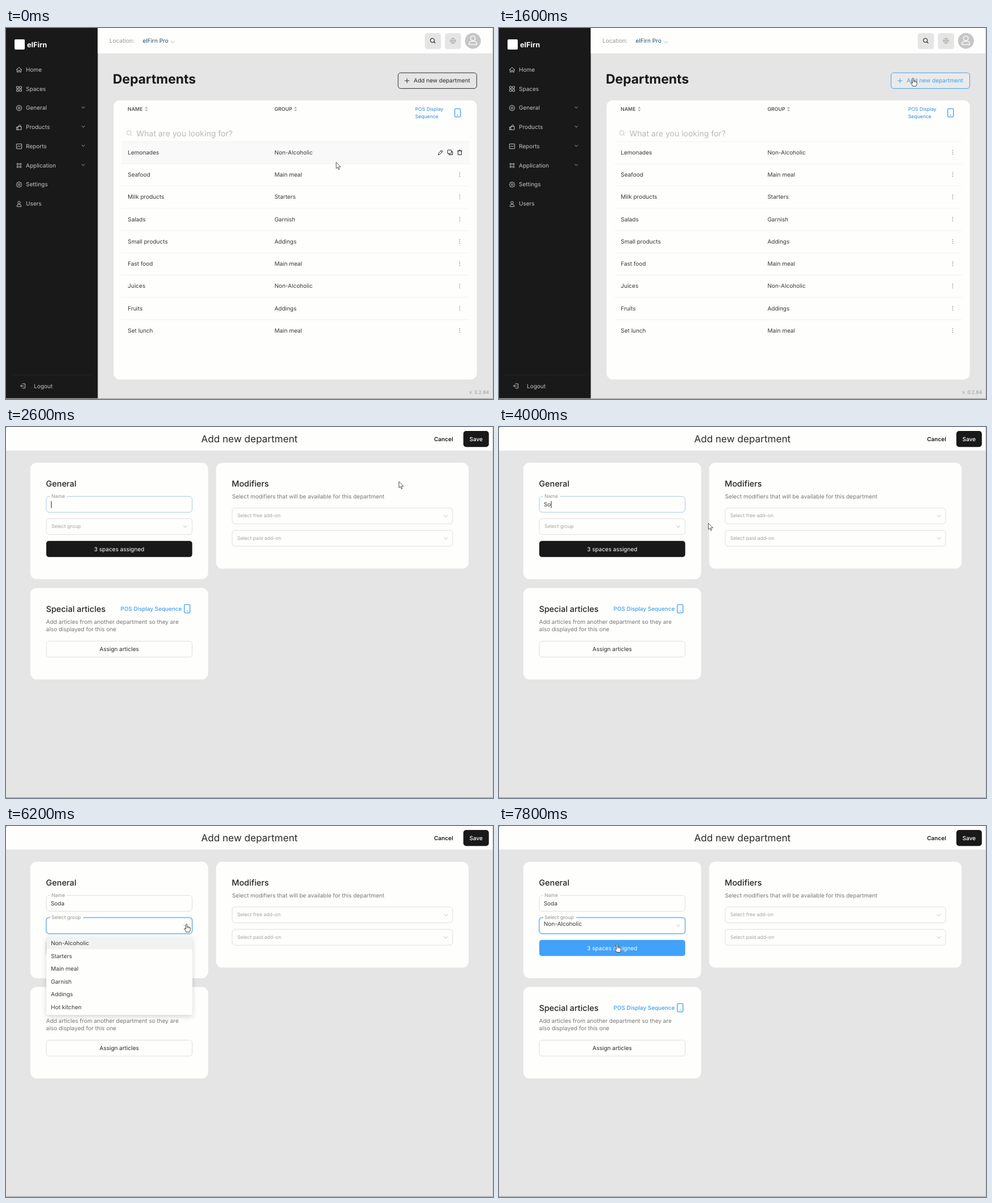
An HTML page for the animation above (8 s loop, 857x654 px).

```html
<!DOCTYPE html>
<html lang="en">
<head>
<meta charset="utf-8">
<title>Departments</title>
<style>
  html, body { margin: 0; width: 100%; height: 100%; overflow: hidden; background: #e5e5e5; }
  svg { display: block; width: 857px; height: 654px; }
  text { font-family: Inter, sans-serif; text-rendering: geometricPrecision; white-space: pre; }
</style>
</head>
<body>
<svg id="stage" viewBox="0 0 857 654" xmlns="http://www.w3.org/2000/svg">
  <defs>
    <filter id="shadow" x="-10%" y="-10%" width="120%" height="125%">
      <feDropShadow dx="0" dy="3" stdDeviation="4" flood-color="#000" flood-opacity=".16"/>
    </filter>
  </defs>
  <g id="list"></g>
  <g id="form"></g>
  <g id="frame"></g>
  <g id="cursor"></g>
</svg>
<script>
const LOOP = 8000, STEP = 200, OPEN_FORM = 1800, OPEN_MENU = 6200, PICK = 7400;
const PAPER = '#fefefd', INK = '#191919', TEXT = '#383838', BLUE = '#3f9fee', LINE = '#dedede';
const $ = id => document.getElementById(id);

// --- drawing helpers ---
const rect = (x, y, w, h, r, fill, stroke = 'none', sw = 1, extra = '') =>
  `<rect x="${x}" y="${y}" width="${w}" height="${h}" rx="${r}" fill="${fill}" stroke="${stroke}" stroke-width="${sw}" ${extra}/>`;
const text = (x, mid, str, size = 10, fill = TEXT, weight = 400, anchor = 'start') =>
  `<text x="${x}" y="${mid + size * 0.364}" font-size="${size}" fill="${fill}" font-weight="${weight}" text-anchor="${anchor}">${str}</text>`;
const path = (d, stroke, sw = 1, fill = 'none') =>
  `<path d="${d}" fill="${fill}" stroke="${stroke}" stroke-width="${sw}" stroke-linecap="round" stroke-linejoin="round"/>`;
const circle = (x, y, r, fill, stroke = 'none', sw = 1) =>
  `<circle cx="${x}" cy="${y}" r="${r}" fill="${fill}" stroke="${stroke}" stroke-width="${sw}"/>`;
const at = (x, y, body) => `<g transform="translate(${x} ${y})">${body}</g>`;
const chevron = (x, y, color, w = 2.8) => at(x, y, path(`M${-w} ${-w / 2}L0 ${w / 2}L${w} ${-w / 2}`, color));
const lens = (x, y, r, color, sw) =>
  at(x, y, circle(-0.6, -0.6, r, 'none', color, sw) + path(`M${r * 0.6} ${r * 0.6}l2 2`, color, sw));
const tablet = (x, y, h) => rect(x - 5, y - h / 2, 10, h, 1.6, 'none', BLUE, 1.3) + circle(x, y + h / 2 - 3.2, 0.9, BLUE);

// --- sidebar icons, centred on 0,0 ---
const G = '#c8c8c8';
const squares = (s, gap) => [-1, 1].map(a => [-1, 1].map(b =>
  rect(a * gap - s / 2, b * gap - s / 2, s, s, 0.4, 'none', G)).join('')).join('');
const polygon = (n, r, wobble = 0) => 'M' + Array.from({ length: n }, (_, i) => {
  const a = i / n * Math.PI * 2 - Math.PI / 2, q = r - (i % 2 ? wobble : 0);
  return (q * Math.cos(a)).toFixed(2) + ' ' + (q * Math.sin(a)).toFixed(2);
}).join('L') + 'Z';
const person = (color, sw) => circle(0, -2, 2.2, 'none', color, sw) +
  path('M-3.7 4.6V3.6Q-3.5 1.4-1.4 1.2H1.4Q3.5 1.4 3.7 3.6V4.6Z', color, sw);
const icons = {
  Home: path('M-4.6 0L0-4.2 4.6 0M-3.4-.8V4.2H-1.2V1.2H1.2V4.2H3.4V-.8', G),
  Spaces: squares(3.6, 2.6),
  General: path(polygon(8, 4.8), G) + circle(0, 0, 1.8, 'none', G),
  Products: path('M-1.8-1.2H4V4.4H-1.8ZM-.4-1.2V-3Q1.2-5.4 2.6-3V-1.2M-4.4 0H-1.8M-4.4 4.4H-1.8M-4.4 0V4.4', G),
  Reports: rect(-4.6, -4.2, 9.2, 8.4, 0.6, 'none', G) + path('M-2.8 1L-1-1 .8.8 2.8-1.4', G),
  Application: squares(2.6, 2.4),
  Settings: path(polygon(16, 5, 1), G) + circle(0, 0, 1.7, 'none', G),
  Users: person(G, 1)
};

const rows = [
  ['Lemonades', 'Non-Alcoholic'], ['Seafood', 'Main meal'], ['Milk products', 'Starters'],
  ['Salads', 'Garnish'], ['Small products', 'Addings'], ['Fast food', 'Main meal'],
  ['Juices', 'Non-Alcoholic'], ['Fruits', 'Addings'], ['Set lunch', 'Main meal']
];
const groups = ['Non-Alcoholic', 'Starters', 'Main meal', 'Garnish', 'Addings', 'Hot kitchen'];

function sidebar() {
  let s = rect(0, 0, 161.5, 654, 0, INK) + rect(15, 20, 18, 18, 2, '#fff') +
    text(37, 29.5, 'elFirn', 12.7, '#fff', 700);
  Object.keys(icons).forEach((name, i) => {
    const y = 73.2 + i * 33.75;
    s += at(23, y + 0.4, icons[name]) + text(35, y, name, 10, '#c4c4c4');
    if (i > 1 && i < 6) s += chevron(136, y - 0.6, '#a5a5a5', 2.5);
  });
  return s + rect(8, 611, 146, 1, 0, '#232323') +
    at(30, 631, path('M-1-3.8H3.6V3.8H-1M1 0H-4.4M-2.4-2L-4.4 0L-2.4 2', G)) +
    text(49, 631, 'Logout', 10, '#c4c4c4');
}

function topBar() {
  return rect(161.5, 0, 696, 44.7, 0, PAPER) + text(182, 22, 'Location:', 10.1, '#999') +
    text(240.5, 22.5, 'elFirn Pro', 10, '#1b5272') + chevron(293.5, 25, '#b5b5b5', 3.2) +
    rect(737, 9, 28.5, 28.2, 4.5, '#e5e5e5') + lens(751, 22.4, 3.5, '#222', 1.1) +
    rect(772.3, 9, 28.5, 28.2, 4.5, '#e5e5e5') +
    at(786.5, 22.7, circle(0, 0, 4.6, 'none', '#999', 0.8) +
      path('M-4.6 0H4.6M0-4.6Q-4 0 0 4.6M0-4.6Q4 0 0 4.6', '#999', 0.8)) +
    circle(821.6, 22.7, 14, '#c6c6c6') +
    at(821.6, 22, circle(0, -3.8, 4.1, 'none', '#fff', 1.3) +
      path('M-6.8 7.2V5.6Q-6.2 2-2.6 1.4H2.6Q6.2 2 6.8 5.6V7.2Z', '#fff', 1.3));
}

const sorter = (x, y) => path(`M${x - 2} ${y - 1.4}h4l-2-2.4ZM${x - 2} ${y + 1.4}h4l-2 2.4Z`, '#aaa', 0.5, '#aaa');

function rowTools(y) {
  const c = '#222';
  return at(764.7, y, path('M-4 4L-3.3 1.3 1.8-3.8 3.8-1.8-1.3 3.3ZM.6-2.6L2.6-.6', c)) +
    at(781.5, y, rect(-4.4, -4.2, 6.6, 6.2, 0.6, 'none', c) + path('M-2 2V4.2H4.4V-1.6H2.2', c)) +
    at(798.5, y, path('M-4-2.6H4M-1.4-2.8V-4.2H1.4V-2.8M-3-2.4V4.2H3V-2.4', c));
}

function listView(c) {
  const over = c.y < 110 && c.x > 690, tone = over ? BLUE : '#2b2b2b';
  const hovered = Math.floor((c.y - 200) / 39.25);
  let s = rect(161, 44, 696, 610, 0, '#e5e5e5') + sidebar() + topBar() +
    text(188, 89.7, 'Departments', 22.9, INK, 700) +
    rect(690, 79, 138.3, 27.6, 4.5, over ? '#eaeaea' : '#e5e5e5', tone) +
    path('M702 93h7.4M705.7 89.3v7.4', tone) + text(717.6, 92.8, 'Add new department', 10, tone) +
    rect(189.3, 127.5, 639.2, 492, 11, PAPER) +
    text(214, 142.6, 'NAME', 8.8, '#555', 600) + sorter(247, 142.8) +
    text(472.5, 142.6, 'GROUP', 8.8, '#555', 600) + sorter(509.5, 142.8) +
    text(720, 142.7, 'POS Display', 8.6, '#2f86dd') + text(720, 155.8, 'Sequence', 8.6, '#2f86dd') +
    tablet(794.7, 149.5, 14.4) +
    lens(216.8, 185.4, 3.9, '#c2c2c2', 1) + text(229.5, 185.7, 'What are you looking for?', 14, '#b9b9b9');
  rows.forEach(([name, group], i) => {
    const y = 219.3 + i * 39.25;
    if (i === hovered) s += rect(203, y - 19, 612, 38.6, 0, '#f9f9f9');
    s += rect(203, y - 19.6, 612, 0.8, 0, '#efefef') +
      text(214.3, y, name) + text(472.4, y, group);
    s += i === hovered ? rowTools(y) : [-3.2, 0, 3.2].map(d => circle(798.4, y + d, 0.8, '#777')).join('');
  });
  return s + text(850, 642, 'v. 0.2.84', 8.5, '#9a9a9a', 400, 'end');
}

// Input box; a raised label cuts into the top border.
function field(x, y, w, label, { raised, border = LINE, sw = 1, gap = 0, arrow, labelY } = {}) {
  const ly = labelY || (raised ? y - 0.4 : y + 13.4);
  return rect(x, y, w, 28, 5, PAPER, border, sw) +
    (raised ? rect(x + 7, y - 3, gap, 6, 0, PAPER) : '') +
    text(x + 9, ly, label, 8.6, raised ? '#929292' : '#a3a3a3') +
    (arrow ? chevron(x + w - 12, y + 14.2, '#b8b8b8', 3) : '');
}

function menu() {
  return rect(71, 195, 257, 138, 1.5, PAPER, 'none', 0, 'filter="url(#shadow)"') +
    rect(71, 195.3, 257, 22, 0, '#f2f2f2') +
    groups.map((g, i) => text(79, 206.6 + i * 22.5, g)).join('');
}

function formView(t, c) {
  const fresh = t < 2000, open = t >= OPEN_MENU && t < PICK, chosen = t >= PICK;
  const active = t >= OPEN_MENU, soft = '#a5cbe4';
  const typed = t < 3600 ? 0 : Math.min(4, 1 + Math.max(0, Math.floor((t - 3800) / STEP)));
  const word = 'Soda'.slice(0, typed);
  const caretX = [79.3, 85.7, 91.4, 97.5, 103.4][typed];
  const overGroup = c.x < 328 && c.y > 161 && c.y < 190;
  const btn = fresh ? PAPER : chosen ? '#42a1f8' : INK;

  let s = rect(0, 0, 857, 654, 0, '#e5e5e5') + rect(0, 0, 857, 41.6, 0, PAPER) +
    text(428.3, 21, 'Add new department', 17.1, '#2a2a2a', 400, 'middle') +
    text(753.2, 21, 'Cancel', 10, INK, 600) + rect(804.8, 7, 44.9, 28.2, 5, INK) +
    text(827.2, 21, 'Save', 10, '#fff', 500, 'middle') +
    rect(42.8, 63, 312.9, 205.3, 11, PAPER) + rect(369.7, 63, 444.4, 186.6, 11, PAPER) +
    rect(42.8, 283.8, 312.9, 161.2, 11, PAPER) +
    text(70.3, 100, 'General', 14.4, '#222', 500) + text(397.3, 100, 'Modifiers', 14.4, '#222', 500) +
    text(397.7, 122, 'Select modifiers that will be available for this department', 10, '#777') +
    field(398, 142.8, 388, 'Select free add-on', { arrow: true }) +
    field(398, 182.1, 388, 'Select paid add-on', { arrow: true });

  s += field(71, 122.3, 256.5, 'Name', {
    raised: !fresh, gap: 29, border: fresh || active ? LINE : soft, labelY: fresh ? 132.3 : 0
  }) + text(78.7, 136.5, word);
  if (fresh) s += rect(78.6, 139.2, 1.2, 3.8, 0, '#222');
  else if (!active) s += rect(caretX, 130.5, 1, 12.3, 0, '#222');

  if (active) s += rect(70.4, 161, 257.7, 29.2, 5.5, 'none', '#d3e8fa', 2.4);
  s += field(71, 161.6, 256.5, 'Select group', {
    raised: active, gap: 58, arrow: true, border: active ? '#6db4ee' : overGroup ? soft : LINE, sw: active ? 1.3 : 1
  });
  if (chosen) s += text(78.7, 172.7, 'Non-Alcoholic');

  s += rect(71, 201, 256.5, 28, 4.5, btn, fresh ? LINE : btn, fresh ? 1 : 0.4) +
    text(199.2, 215, '3 spaces assigned', 10, fresh ? '#2a2a2a' : '#fff', 400, 'middle') +
    text(70.4, 320.7, 'Special articles', 14.4, '#222', 500) +
    text(201.6, 320.7, 'POS Display Sequence', 9.9, BLUE, 500) + tablet(318.8, 320.4, 14.4) +
    text(70.6, 343, 'Add articles from another department so they are', 10, '#777') +
    text(70.6, 356.3, 'also displayed for this one', 10, '#777') +
    rect(71, 377.6, 256.5, 28, 5, PAPER, LINE) +
    text(199.2, 391.4, 'Assign articles', 10, '#2a2a2a', 400, 'middle');
  return s + (open ? menu() : '') + path('M0 0H1.5L0 1.5Z', '#555', 0.2, '#555');
}

// --- pointer: [time, x, y], eased between stops ---
const stops = [
  [0, 581, 237], [1400, 728.5, 88], [1799, 728.5, 88], [1800, 729, 88], [2400, 729, 88],
  [3400, 368.5, 170], [5000, 368.5, 170], [5200, 365, 170], [5400, 365, 170], [5600, 323, 173],
  [5800, 317.5, 172.3], [6200, 317.5, 172.3], [6800, 226.5, 220], [7200, 220, 206], [7400, 214, 206.5], [7800, 207.6, 208]
];
function pointer(t) {
  const i = Math.max(1, stops.findIndex(s => s[0] >= t));
  const [a, b] = t > 7800 ? [stops.at(-1), stops.at(-1)] : [stops[i - 1], stops[i]];
  const k = Math.min(1, (t - a[0]) / (b[0] - a[0] || 1)), e = k * k * (3 - 2 * k);
  const x = a[1] + (b[1] - a[1]) * e, y = a[2] + (b[2] - a[2]) * e;
  const hand = t < OPEN_FORM ? x > 690 && y < 107
    : x < 328 && ((y > 161 && y < 190) || y > 195);
  return { x, y, hand };
}
const arrow = path('M0 0V10.6L2.4 8.4 4.2 12.6 5.9 11.9 4.1 7.8H7.6Z', '#444', 0.9, '#fff');
const hand = path('M-1.2 1Q0-.6 1.2 1V5.2Q2.4 4.4 3.2 5.6Q4.4 4.8 5.1 6.2Q6.8 5.8 6.8 7.6V10.6Q6.6 12.4 5.4 14.6H-.4Q-1.4 12.4-3.6 9.6Q-4.2 8-2.8 8L-1.2 9.4Z', '#333', 0.9, '#fff') +
  path('M1.2 5.4V7.4M3.2 5.8V7.6M5.1 6.4V7.8', '#333', 0.7);

$('frame').innerHTML = rect(0, 652.7, 857, 1.3, 0, '#a9a9a9') + rect(856, 0, 1, 654, 0, '#cfcfcf');

let last = -1;
function draw(now) {
  const t = Math.floor(now % LOOP / STEP) * STEP;
  if (t !== last) {
    last = t;
    const c = pointer(t), first = t < OPEN_FORM;
    $('list').innerHTML = first ? listView(c) : '';
    $('form').innerHTML = first ? '' : formView(t, c);
    $('cursor').innerHTML = at(c.x, c.y, c.hand ? hand : arrow);
  }
}
const start = performance.now();
function tick() {
  draw(performance.now() - start);
  requestAnimationFrame(tick);
}
tick();
</script>
</body>
</html>
```
